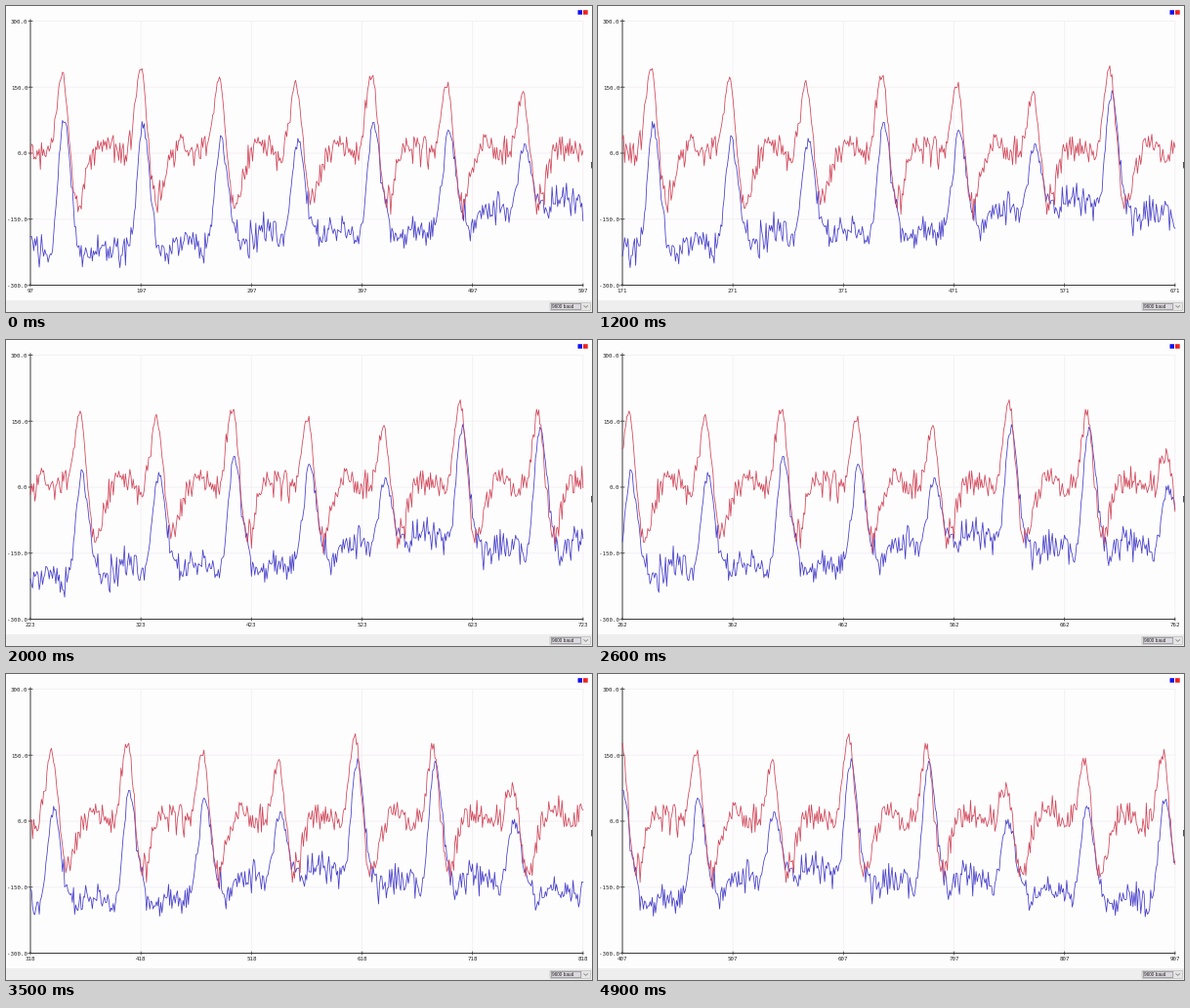
A matplotlib script that plays this animation: 600x314 px, repeating every 5000 ms.

```python
import numpy as np
import matplotlib.pyplot as plt
from matplotlib.animation import FuncAnimation
from matplotlib.patches import Rectangle

W, H, DPI = 600, 314, 100
FRAMES, INTERVAL = 50, 100
LEFT, RIGHT, TOP, BOTTOM = 25, 590.8, 15.5, 286.5
SPAN = 500
FIRST, LAST = 97, 907
INK, GRID = "#3a3a3a", "#f3f1f4"

# Peak height of each heartbeat in both channels
RED_PEAKS = [190, 200, 174, 166, 188, 160, 140, 198, 175, 85, 140, 157]
BLUE_PEAKS = [70, 65, 35, 30, 68, 53, 10, 137, 134, 0, 40, 45]


def pt(px):
    return px * 72 / DPI


def to_y(value):
    return BOTTOM - (value + 300) * (BOTTOM - TOP) / 600


def bump(t, centre, rise, fall):
    """Bell with separate widths before and after its centre."""
    u = t - centre
    return np.exp(-0.5 * (u / np.where(u < 0, rise, fall)) ** 2)


samples = np.arange(FIRST, LAST + 1)
rng = np.random.default_rng(11)

# Nearly even pulse with a slow drift of the interval
count = np.arange(len(RED_PEAKS))
beats = 125.6 + 69.8 * count + 2.5 * np.sin(2 * np.pi * count / 9)

red = np.full(samples.size, -4.0)
blue_base = np.interp(samples, [97, 115, 240, 310, 450, 510, 580, 650, 720, 800, 907],
                      [-200, -225, -205, -175, -170, -125, -95, -135, -125, -160, -175])
blue = blue_base.copy()
calm = np.zeros(samples.size)
for beat, red_peak, blue_peak in zip(beats, RED_PEAKS, BLUE_PEAKS):
    t = samples - beat
    red += (red_peak * bump(t, 0, 4.9, 4.6) - 112 * bump(t, 13.5, 4.5, 6.8)
            + 24 * bump(t, 36, 7, 9))
    blue += ((blue_peak - blue_base) * bump(t, 1.8, 5, 6)
             - 22 * bump(t, -12, 5, 4) - 22 * bump(t, 21, 5, 7))
    calm += bump(t, 1, 7, 8)


def with_noise(values):
    noise = np.clip(rng.normal(size=samples.size), -2.4, 2.4)
    return to_y(values + noise * (18 - 10 * np.minimum(calm, 1)))


red_y, blue_y = with_noise(red), with_noise(blue)
xs = np.linspace(LEFT, RIGHT, SPAN + 1)

# Sample at the left edge, scrolling at an almost steady rate
starts = np.rint(np.interp(np.arange(FRAMES), [0, 12, 20, 26, 35, 42, 49],
                           [97, 171, 223, 262, 318, 361, 407])).astype(int)

fig = plt.figure(figsize=(W / DPI, H / DPI), dpi=DPI, facecolor="#fefdfe")
ax = fig.add_axes([0, 0, 1, 1])
ax.set(xlim=(0, W), ylim=(H, 0))
ax.axis("off")


def box(x, y, w, h, fill, edge="none", lw=0.0):
    ax.add_patch(Rectangle((x, y), w, h, fc=fill, ec=edge, lw=pt(lw),
                           snap=False, zorder=4))


def stroke(x, y, color=INK, lw=1.0, **style):
    return ax.plot(x, y, color=color, lw=pt(lw), snap=False, **style)[0]


def label(x, y, text, ha):
    return ax.text(x, y, text, ha=ha, va="center_baseline", color="#222222",
                   family="DejaVu Sans Mono", size=pt(5.8), zorder=5)


# Grid, axes and ticks
tick_x = np.linspace(LEFT, RIGHT, 6)
for value in (300, 150, 0, -150, -300):
    y = to_y(value)
    if value > -300:
        stroke([LEFT, RIGHT], [y, y], GRID)
    stroke([LEFT - 2, LEFT + 2], [y, y], lw=0.8)
    label(22.5, y + 0.3, f"{value:.1f}", "right")
for x in tick_x:
    if x > LEFT:
        stroke([x, x], [TOP, BOTTOM], GRID)
    stroke([x, x], [BOTTOM - 1.5, BOTTOM + 1.5], lw=0.8)
stroke([LEFT, LEFT], [TOP - 1.5, BOTTOM])
stroke([LEFT, RIGHT], [BOTTOM, BOTTOM])
x_labels = [label(x, 291.7, "", "center") for x in tick_x]

# Legend, pointer edge and footer with the baud selector
box(585.5, 4.2, 4.5, 4.6, "#1010f5")
box(591, 4.2, 4.7, 4.6, "#ee2222")
box(599, 160, 1, 6.5, "#555555")
box(0, 302, W, 12, "#eeeeee")
box(557, 304.5, 41.5, 7.8, "#e6e6e6", "#b4b4b4", 0.6)
box(558.3, 305.4, 30.5, 6, "#dcd8e0", "#777777", 0.6)
ax.text(559.3, 308.5, "9600 baud", va="center_baseline", color="#222222",
        family="Liberation Sans", size=pt(4.8), zorder=5)
stroke([591.7, 593.7, 595.7], [307.5, 309.4, 307.5], "#777777", 0.7, zorder=5)

blue_line = stroke([], [], "#463fc8", 0.8, zorder=3)
red_line = stroke([], [], "#d04658", 0.8, zorder=3)


def update(frame):
    start = starts[frame]
    window = slice(start - FIRST, start - FIRST + SPAN + 1)
    blue_line.set_data(xs, blue_y[window])
    red_line.set_data(xs, red_y[window])
    for i, text in enumerate(x_labels):
        text.set_text(str(start + 100 * i))
    return [blue_line, red_line, *x_labels]


anim = FuncAnimation(fig, update, frames=FRAMES, interval=INTERVAL,
                     repeat=True, repeat_delay=0, blit=False)
plt.show()
```
